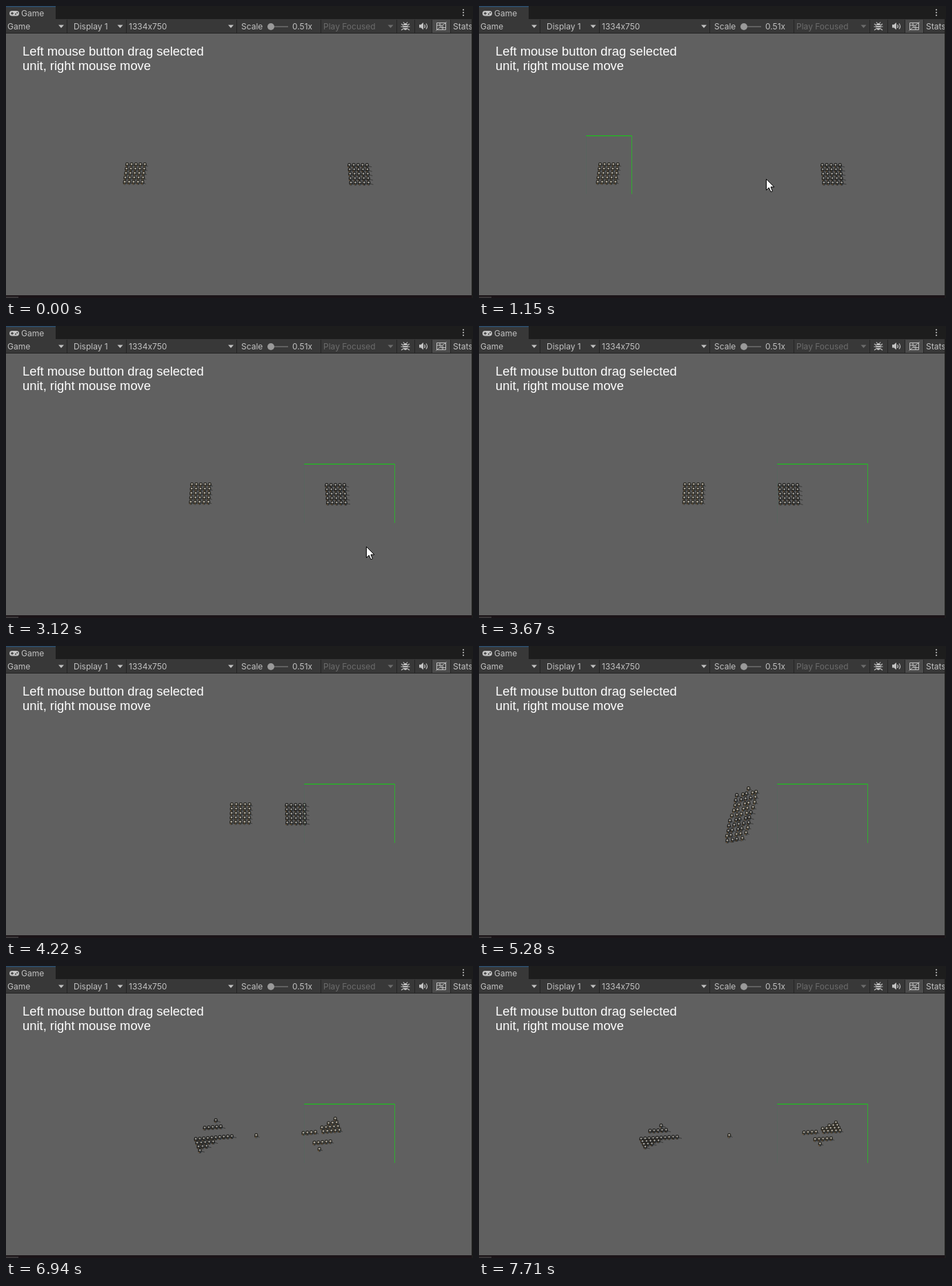
Animation of 677 by 424 pixels, one loop 7.78 s. Source, as an HTML page with a canvas:

```html
<!DOCTYPE html>
<html lang="en">
<head>
<meta charset="utf-8">
<title>Unit selection</title>
<style>
  html, body { margin: 0; width: 100%; height: 100%; overflow: hidden; background: #1b1b1b; }
  svg, canvas { position: absolute; left: 0; top: 0; width: 677px; height: 424px; display: block; }
  .ui { font: 12px Inter, "Open Sans", sans-serif; font-feature-settings: "calt" 0; fill: #c2c2c2; }
  .dim { fill: #6c6c6c; }
  .hint { font: 18.4px "Liberation Sans", Arial, sans-serif; fill: #fff; }
</style>
</head>
<body>
<svg viewBox="0 0 677 424">
  <rect width="677" height="424" fill="#1d1d1d"/>
  <rect width="72" height="20" fill="#383838"/>
  <rect width="72" height="1.5" fill="#2c5070"/>
  <rect y="19" width="677" height="21" fill="#383838"/>
  <rect y="39" width="677" height="1" fill="#252525"/>
  <rect y="40" width="675" height="380" fill="#606060"/>
  <rect y="420" width="677" height="4" fill="#1b1418"/>
  <rect y="422" width="18" height="2" fill="#3a3638"/>
  <rect x="618" y="20" width="26" height="19" fill="#4b4b4b"/>
  <path d="M88.5 20V39M174.5 20V39M334.5 20V39M456.5 20V39M566.5 20V39M592.5 20V39M617.5 20V39M644.5 20V39" stroke="#252525"/>
  <g fill="#c2c2c2">
    <path d="M76 27.5h8l-4 4.5zM161.5 27.5h8l-4 4.5zM322 27.5h8l-4 4.5z"/>
    <path d="M553.5 27.5h8l-4 4.5z" fill="#6c6c6c"/>
    <rect x="5" y="7" width="14" height="7.5" rx="3.7"/>
    <circle cx="663" cy="5.5" r="1.1"/><circle cx="663" cy="9.5" r="1.1"/><circle cx="663" cy="13.5" r="1.1"/>
  </g>
  <path d="M7 10.7h4M9 8.7v4" stroke="#383838" stroke-width="1.2"/>
  <circle cx="14" cy="11.8" r="1" fill="#383838"/><circle cx="16.3" cy="9.7" r="1" fill="#383838"/>
  <path d="M379 30H409" stroke="#606060" stroke-width="2"/>
  <circle cx="384" cy="30" r="5" fill="#999"/>
  <g fill="none" stroke="#c2c2c2" stroke-width="1.2">
    <path d="M576 23.500l1.500 2M582 23.500l-1.500 2M573 26l3 2M585 26l-3 2M572.500 30h3.500M582 30h3.500M573 35l3-2M585 35l-3-2"/>
    <path d="M606.500 27q2 2.500 0 5M609 25.500q3 4 0 8"/>
    <path d="M624.500 24.500h13v10h-13zM624.500 28h7M630 31.500h7M629 24.500v5M633 29v5M623.500 35.500l15-12" stroke-width="1"/>
  </g>
  <ellipse cx="579" cy="30" rx="3.5" ry="5" fill="#c2c2c2"/>
  <path d="M576 28.5h6M576 31.5h6" stroke="#383838"/>
  <path d="M599 27h2.500l3.500-3v10.500l-3.500-3h-2.500z" fill="#c2c2c2"/>
  <g class="ui">
    <text x="22" y="15">Game</text>
    <text x="2" y="34">Game</text>
    <text x="98" y="34">Display 1</text>
    <text x="178" y="34">1334x750</text>
    <text x="341" y="34">Scale</text>
    <text x="415" y="34">0.51x</text>
    <text x="460" y="34" class="dim">Play Focused</text>
    <text x="648" y="34">Stats</text>
  </g>
  <rect x="675" y="19" width="2" height="405" fill="#1d1d1d"/>
  <g class="hint">
    <text x="24" y="72">Left mouse button drag selected</text>
    <text x="24" y="93">unit, right mouse move</text>
  </g>
</svg>
<canvas width="677" height="424"></canvas>
<script>
const LOOP = 7780, FRAMES = 112, STEP = LOOP / FRAMES, SPEED = 0.0525;
const CLASH = 4690, MELEE = 5280, APART = 6250, END = 7710;
const SIDE = 5, GAP = 6.4, MID = 380;
const ctx = document.querySelector('canvas').getContext('2d');

const armies = [
  { x: 187, y: 243, dir: 1, start: 1320, cx: 422, head: '#aaa498', body: '#292823' },
  { x: 512, y: 244, dir: -1, start: 2494, cx: 337, head: '#9c9a94', body: '#20201f' }
];
const ranks = [1, 5, 10, 5, 3, 1];   // soldiers per line once the armies have parted

// Pointer waypoints: time, x, y
const path = [
  [140, 262, 334], [410, 155, 188], [830, 222, 273], [1300, 546, 236], [1730, 432, 200],
  [2030, 564, 286], [2153, 517, 220], [2490, 142, 243], [3126, 522, 320], [3270, 627, 406]
];
const drags = [[path[1], path[2]], [path[4], path[5]]];

const lerp = (a, b, k) => a + (b - a) * k;
const byX = (a, b) => a.open[0] - a.army.cx - b.open[0] + b.army.cx;
const byY = (a, b) => a.open[1] - b.open[1];

function along(keys, t) {
  let i = 1;
  while (i < keys.length - 1 && t > keys[i][0]) i++;
  const [t0, x0, y0] = keys[i - 1], [t1, x1, y1] = keys[i];
  const k = (t - t0) / (t1 - t0);
  return [lerp(x0, x1, k), lerp(y0, y1, k)];
}

function marching({ army: a, row, col }, t) {
  const cx = a.x + a.dir * SPEED * Math.max(0, t - a.start);
  const lean = (cx - MID) * 0.0045;
  return [cx + (col - 2) * GAP + (row - 2) * lean, a.y + (row - 2) * GAP];
}

// Two thin lines ahead of a dense block; the two armies are point reflections.
function recruit(army) {
  const units = [], axis = 245 - 5 * army.dir;
  ranks.forEach((n, r) => {
    const x0 = r < 2 ? 4 - 16 * r : 2 * r - 29;
    const y0 = r < 2 ? 14 * r - 28 : 7 * r - 7;
    for (let i = 0; i < n; i++) {
      const x = army.cx - army.dir * (x0 + i * 5.8);
      const y = 245 - army.dir * (y0 - i * 0.6);
      const far = [x + army.dir * SPEED * (END - APART), axis + (y - axis) * 0.55];
      units.push({ army, open: [x, y], far });
    }
  });
  if (army.dir > 0) units[11].open = units[11].far = [363, 246];   // the straggler
  units.sort(byY);
  for (let row = 0; row < SIDE; row++)
    units.slice(row * SIDE, (row + 1) * SIDE).sort(byX)
      .forEach((u, col) => Object.assign(u, { row, col }));
  return units;
}

const units = armies.flatMap(recruit);
const queue = [...units].sort(byY);
for (let r = 0; queue.length; r++) {
  const line = queue.splice(0, r ? SIDE : 1).sort(byX);
  line.forEach((u, i) => {
    const off = i - (line.length - 1) / 2;
    const melee = [391 - r * 2 + off * 7 + Math.sin(r * 5 + i * 3), 207 + r * 7.4 - off * 1.2];
    u.keys = [[CLASH, ...marching(u, CLASH)], [MELEE, ...melee], [APART, ...u.open], [END, ...u.far]];
  });
}

function oval(x, y, rx, ry, fill) {
  ctx.fillStyle = fill;
  ctx.beginPath();
  ctx.ellipse(x, y, rx, ry, 0, 0, 7);
  ctx.fill();
}

function drawUnit(army, x, y, i, t) {
  const sway = Math.sin(t / 150 + i * 1.7) * 0.4;
  ctx.strokeStyle = army.body;
  ctx.lineWidth = 0.6;
  ctx.beginPath();
  ctx.moveTo(x + 1, y + 1);
  ctx.lineTo(x + 5.5 - army.dir, y + 2.4 + sway);
  ctx.stroke();
  oval(x - 0.3, y + 0.2, 2.7, 3.4, army.body);
  ctx.fillStyle = '#70583a';
  ctx.fillRect(x - 2.2 + sway, y + 1.8, 2, 1.3);
  ctx.fillStyle = '#43505c';
  ctx.fillRect(x + 0.2, y + 1.6 + sway, 1.7, 1.2);
  oval(x - 0.3, y - 0.6, 1.35, 1.35, army.head);
}

function drawSelection(t, pointer) {
  const drag = drags.filter(([from]) => t >= from[0]).pop();
  if (!drag) return;
  const [[, x, y], [done, endX, endY]] = drag;
  const [x2, y2] = t < done ? pointer : [endX, endY];
  ctx.fillStyle = '#12d012';
  ctx.fillRect(x, y, x2 - x, 1);
  ctx.fillStyle = '#2fae2f';
  ctx.fillRect(Math.floor(x2) - 1, y, 1, y2 - y);
  ctx.fillStyle = 'rgba(70,110,95,.3)';
  ctx.fillRect(x, y, 1, y2 - y);
}

const arrow = new Path2D('M.5 .5V16.500L4.300 13 7 19 9.500 18 7 12H12z');
function drawPointer([x, y]) {
  ctx.save();
  ctx.translate(x, y);
  ctx.fillStyle = '#fff';
  ctx.strokeStyle = '#000';
  ctx.fill(arrow);
  ctx.lineWidth = 1;
  ctx.stroke(arrow);
  ctx.restore();
}

function draw(t) {
  ctx.clearRect(0, 0, 677, 424);
  units.map((u, i) => [u.army, ...(t < CLASH ? marching(u, t) : along(u.keys, t)), i])
    .sort((a, b) => a[2] - b[2])
    .forEach(spot => drawUnit(...spot, t));
  const pointer = along(path, t);
  drawSelection(t, pointer);
  if (t >= path[0][0] && t <= path[path.length - 1][0]) drawPointer(pointer);
}

const begin = performance.now();
function tick() {
  const t = (performance.now() - begin) % LOOP;
  draw(Math.min(FRAMES - 1, Math.floor((t + 20) / STEP)) * STEP);
  requestAnimationFrame(tick);
}
tick();
</script>
</body>
</html>
```
